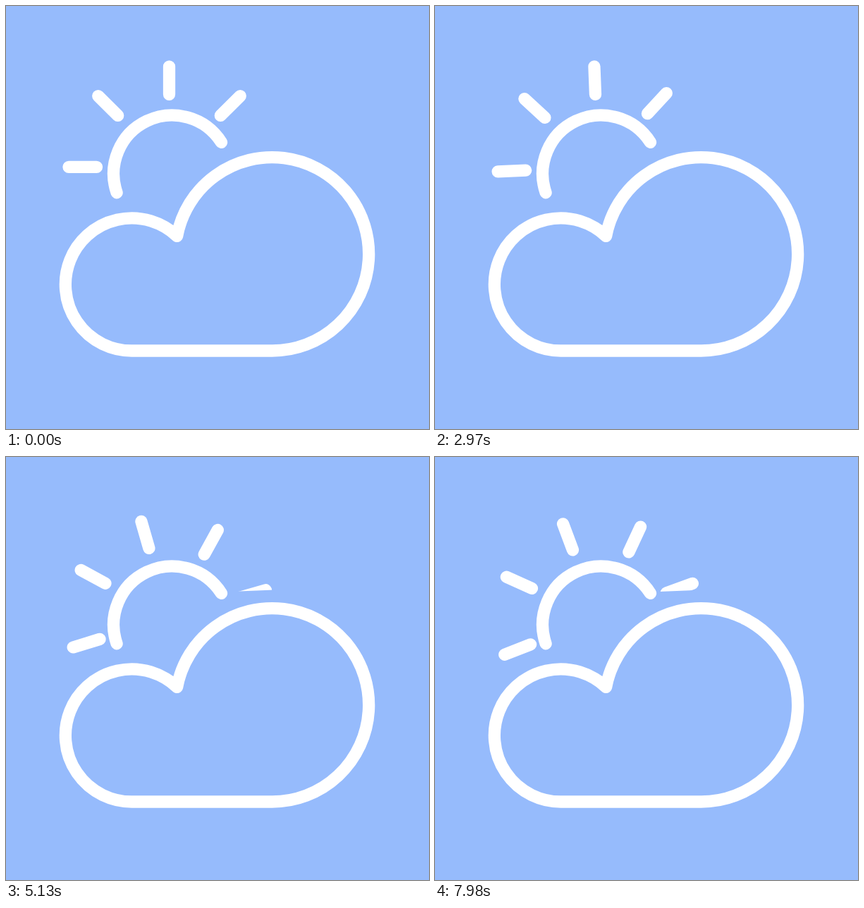
An HTML page that plays this animation: 600 px wide and 600 px high, repeating every 8 s.

```html
<!DOCTYPE html>
<html lang="en">
<head>
<meta charset="utf-8">
<title>Partly cloudy</title>
<style>
  html, body { margin: 0; width: 100%; height: 100%; overflow: hidden; background: #96bbfc; }
  svg { display: block; width: 100vw; height: 100vh; }
</style>
</head>
<body>
<svg viewBox="0 0 600 600" fill="none" stroke="#fff" stroke-width="17.3" stroke-linecap="round" stroke-linejoin="round">
  <clipPath id="sky"><path d="M0 0H600V188.5H380L318 191H240L150 270L85 297H0Z"/></clipPath>
  <g clip-path="url(#sky)"><path id="rays"/></g>
  <path d="M157.1 264.7A82.9 82.9 0 0 1 305.5 193.4"/>
  <path d="M242.6 326.4A94 94 0 1 0 178.5 489H377.25A137.2 137.2 0 1 0 242.6 326.4Z"/>
</svg>
<script>
  const LOOP = 8000, STEP = 30, DEG_PER_MS = 0.0144;
  const CX = 231.5, CY = 228.3, INNER = 103, OUTER = 142.5;
  const rays = document.getElementById('rays');

  // Counted anticlockwise from the top; the later rays trail a little.
  function ray(i) {
    const a = (-90 - 45 * i - 0.43 * Math.max(0, i - 2)) * Math.PI / 180;
    const at = r => `${CX + r * Math.cos(a)} ${CY + r * Math.sin(a)}`;
    return `M${at(INNER)}L${at(OUTER)}`;
  }
  rays.setAttribute('d', [-1, 0, 1, 2, 3, 4, 5, 6].map(ray).join(''));

  function draw(ms) {
    const t = Math.floor((ms % LOOP) / STEP) * STEP;
    rays.setAttribute('transform', `rotate(${t * DEG_PER_MS} ${CX} ${CY})`);
  }

  const start = performance.now();
  function tick() {
    draw(performance.now() - start);
    requestAnimationFrame(tick);
  }
  tick();
</script>
</body>
</html>
```
